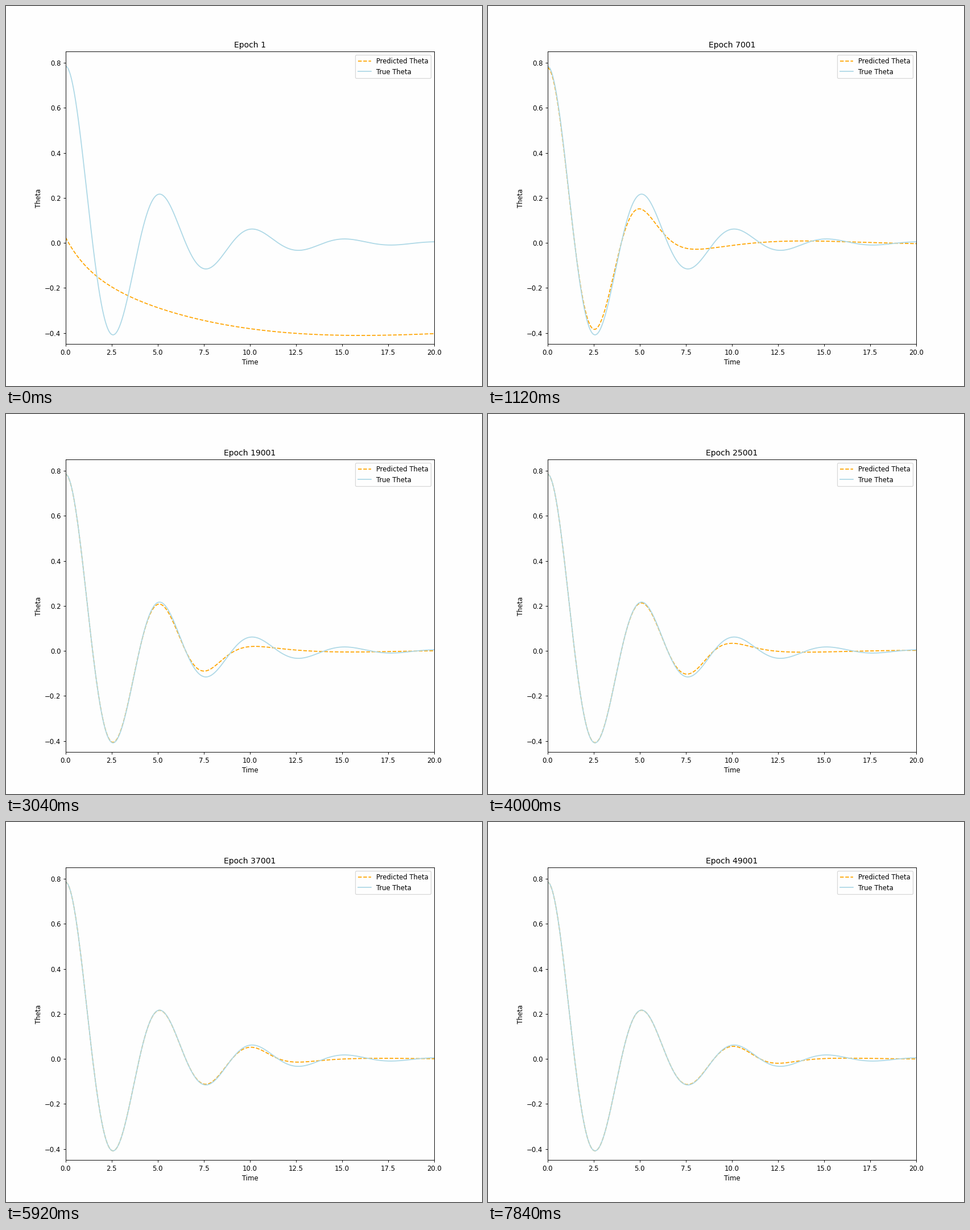
These frames come from a looping animation (837 px wide and 669 px high, 8 s). A matplotlib script:

```python
import numpy as np
import matplotlib.pyplot as plt
from matplotlib.animation import FuncAnimation

W, H, DPI = 837, 669, 83.7
FRAMES, INTERVAL = 50, 160
PAPER = "#fefefe"


def pendulum(t, theta=np.pi / 4, damping=0.5, stiffness=9.81 / 6):
    """Angle of a damped pendulum released at rest, by RK4."""
    def slope(s):
        return np.array([s[1], -damping * s[1] - stiffness * np.sin(s[0])])

    dt = t[1] - t[0]
    state = np.array([theta, 0.0])
    out = [theta]
    for _ in t[1:]:
        k1 = slope(state)
        k2 = slope(state + dt / 2 * k1)
        k3 = slope(state + dt / 2 * k2)
        k4 = slope(state + dt * k3)
        state = state + dt / 6 * (k1 + 2 * k2 + 2 * k3 + k4)
        out.append(state[0])
    return np.array(out)


time = np.linspace(0, 20, 1001)
true = pendulum(time)


def untrained(t):
    s = 16 - t
    return -0.411 + 6.33e-4 * s**2 + 3.33e-5 * s**3 + 0.1375 * np.exp(-t / 1.25)


def predict(epoch):
    """Follow the truth up to a learned time, then slow down and flatten."""
    if epoch == 1:
        return untrained(time)
    learned = min(1.78 * np.sqrt(epoch / 1000), 11.6)
    ahead = time - learned
    lag = 5.5 * np.log1p(np.maximum(ahead, 0) / 5.5)
    warped = np.where(ahead > 0, learned + lag, time)
    trust = 0.14 + 0.86 / (1 + np.exp((ahead - 1.1) / 1.25))
    return trust * np.interp(warped, time, true)


# Tiny excess keeps the size from rounding down a pixel
fig, ax = plt.subplots(figsize=((W + 1e-4) / DPI, (H + 1e-4) / DPI), dpi=DPI, facecolor=PAPER)
ax.set_facecolor(PAPER)
guess, = ax.plot(time, untrained(time), "--", color="orange", label="Predicted Theta")
ax.plot(time, true, color="lightblue", label="True Theta")
ax.set(xlim=(0, 20), ylim=(-0.45, 0.85), xlabel="Time", ylabel="Theta")
title = ax.set_title("Epoch 1")
ax.legend(loc="upper right")


def update(frame):
    epoch = 1000 * frame + 1
    guess.set_ydata(predict(epoch))
    title.set_text(f"Epoch {epoch}")
    return guess, title


anim = FuncAnimation(fig, update, frames=FRAMES, interval=INTERVAL, repeat=True)
plt.show()
```
